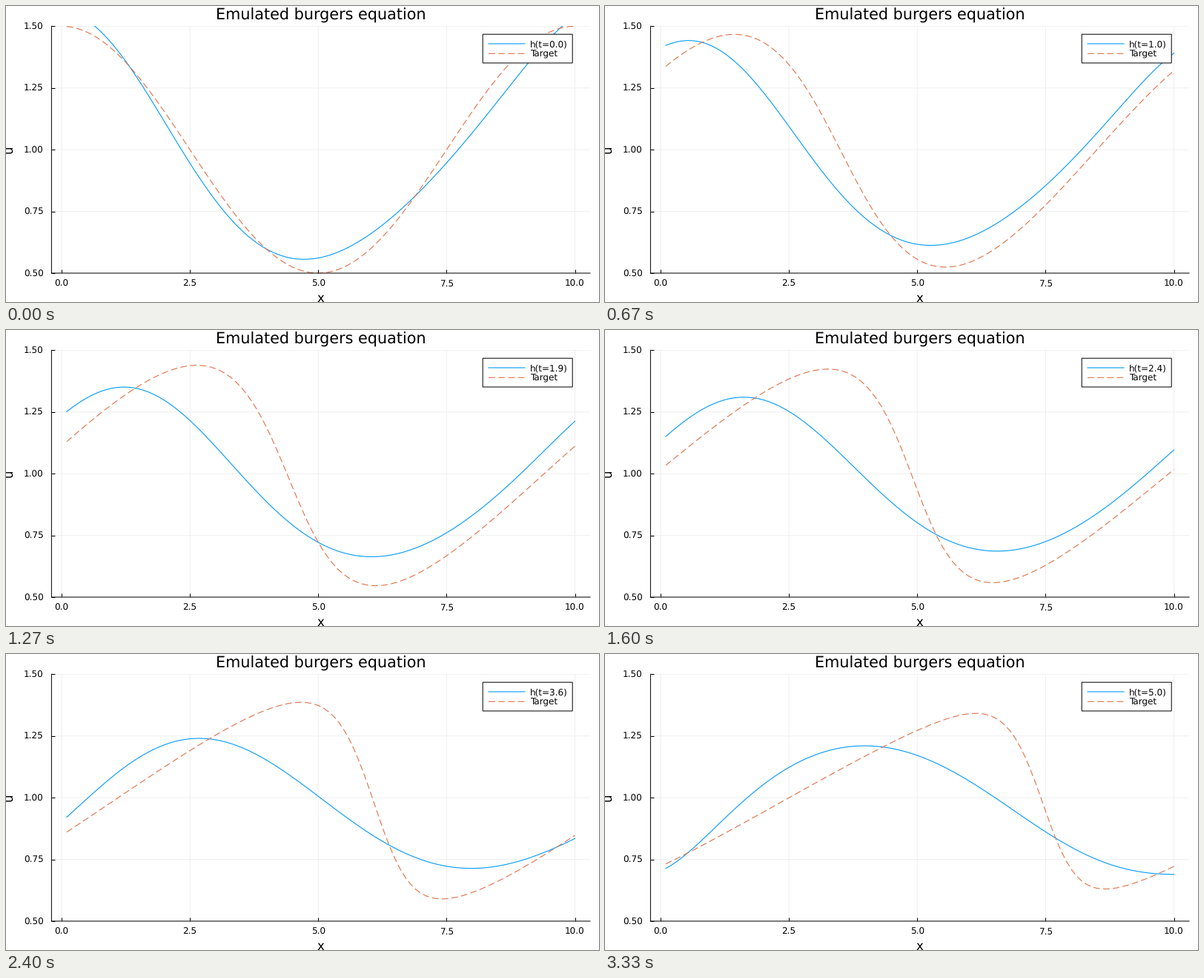
A matplotlib script that plays this animation: 800 by 400 pixels, repeating every 3390 ms.

```python
import numpy as np
import matplotlib.pyplot as plt
from matplotlib.animation import FuncAnimation
from matplotlib.patches import Rectangle

plt.rcParams.update({"font.family": "DejaVu Sans", "text.hinting": "none",
                     "path.snap": False})

W, H = 800, 400
LOOP_MS = 3390
FRAMES = 51
STEP = 0.1
BLUE, ORANGE = "#009afa", "#e26f46"
LINE = 1.1

x = np.linspace(0.1, 10, 100)
dx = x[1] - x[0]


def burgers_rate(u, nu=0.1):
    """Upwind advection and central diffusion on a periodic grid."""
    left, right = np.roll(u, 1), np.roll(u, -1)
    return -u * (u - left) / dx + nu * (right - 2 * u + left) / dx**2


def solve_burgers(substeps=10):
    u = 1 + 0.5 * np.cos(2 * np.pi * x / 10)
    dt = STEP / substeps
    states = [u]
    for _ in range(FRAMES - 1):
        for _ in range(substeps):
            k1 = burgers_rate(u)
            k2 = burgers_rate(u + dt * k1)
            u = u + dt * (k1 + k2) / 2
        states.append(u)
    return states


def poly(t, *coefs):
    """Polynomial in t, lowest power first."""
    return sum(c * t**k for k, c in enumerate(coefs))


def emulate(t):
    """A decaying wave whose phase drifts at five evenly spaced positions."""
    crest = poly(t, 1.57, -0.142, 0.014)
    trough = 0.556 + 0.158 * np.sin(0.42 * t)**1.15
    phases = [
        poly(t, 0.09, -0.44, -0.028),
        poly(t, 1.806, -0.295, -0.1165, 0.0139),
        poly(t, 3.287, -0.159, -0.146, 0.0137),
        poly(t, 4.481, -0.063, -0.1455, 0.0111),
        poly(t, 5.935, 0.06, -0.235, 0.0222),
    ]
    phase = np.polyval(np.polyfit(np.linspace(0, 10, 5), phases, 4), x)
    return (crest + trough) / 2 + (crest - trough) / 2 * np.cos(phase)


target_states = solve_burgers()
emulated_states = [emulate(i * STEP) for i in range(FRAMES)]

fig = plt.figure(figsize=(W / 72, H / 72), dpi=72, facecolor="white")

# Plot area in pixels, measured from the top left corner
L, R, T, B = 61.4, 788.1, 27.3, 361
ax = fig.add_axes([L / W, 1 - B / H, (R - L) / W, (B - T) / H])
ax.set(xlim=(-0.197, 10.297), ylim=(0.5, 1.5),
       xticks=np.arange(0, 10.1, 2.5), yticks=np.arange(0.5, 1.6, 0.25))
ax.tick_params(direction="in", length=5, width=1,
               labelbottom=False, labelleft=False)
ax.grid(color="#efefef", lw=1)
ax.set_axisbelow(True)
for side in ("top", "right"):
    ax.spines[side].set_visible(False)
for side in ("left", "bottom"):
    ax.spines[side].set_linewidth(1)


def label(px, py, text, size=12, ha="center", **kw):
    """Text with its baseline at a pixel position."""
    return fig.text(px / W, 1 - py / H, text, size=size, ha=ha,
                    va="baseline", zorder=12, **kw)


label((L + R) / 2 - 0.3, 18.3, "Emulated burgers equation", 20.75)
label((L + R) / 2, 400, "x", 16.5)
fig.text(3.8 / W, 1 - 193.6 / H, "u", size=16.5, rotation=90,
         ha="center", va="center")
for v in ax.get_xticks():
    label(75 + 69.25 * v, 378.4, f"{v:.1f}")
for v in ax.get_yticks():
    label(50.5, B - (v - 0.5) * (B - T) + 4.4, f"{v:.2f}", ha="right")

blue_style = dict(color=BLUE, lw=LINE)
dash_style = dict(color=ORANGE, lw=LINE, ls=(0, (8, 4)),
                  dash_capstyle="butt")
emulated_line, = ax.plot([], [], **blue_style)
target_line, = ax.plot([], [], **dash_style)

# Legend
fig.add_artist(Rectangle((643.2 / W, 1 - 77 / H), 121 / W, 38.8 / H,
                         fc="white", ec="black", lw=1, zorder=10))
for py, style in ((51, blue_style), (64.3, dash_style)):
    fig.add_artist(plt.Line2D([651 / W, 700 / W], [1 - py / H] * 2,
                              zorder=11, **style))
time_label = label(707, 55.3, "h(t=0.0)", ha="left")
label(707.3, 68.6, "Target", ha="left")


def draw(i):
    emulated_line.set_data(x, emulated_states[i])
    target_line.set_data(x, target_states[i])
    time_label.set_text(f"h(t={i * STEP:.1f})")
    return emulated_line, target_line, time_label


anim = FuncAnimation(fig, draw, frames=FRAMES, interval=LOOP_MS / FRAMES,
                     repeat=True, repeat_delay=0)
plt.show()
```
